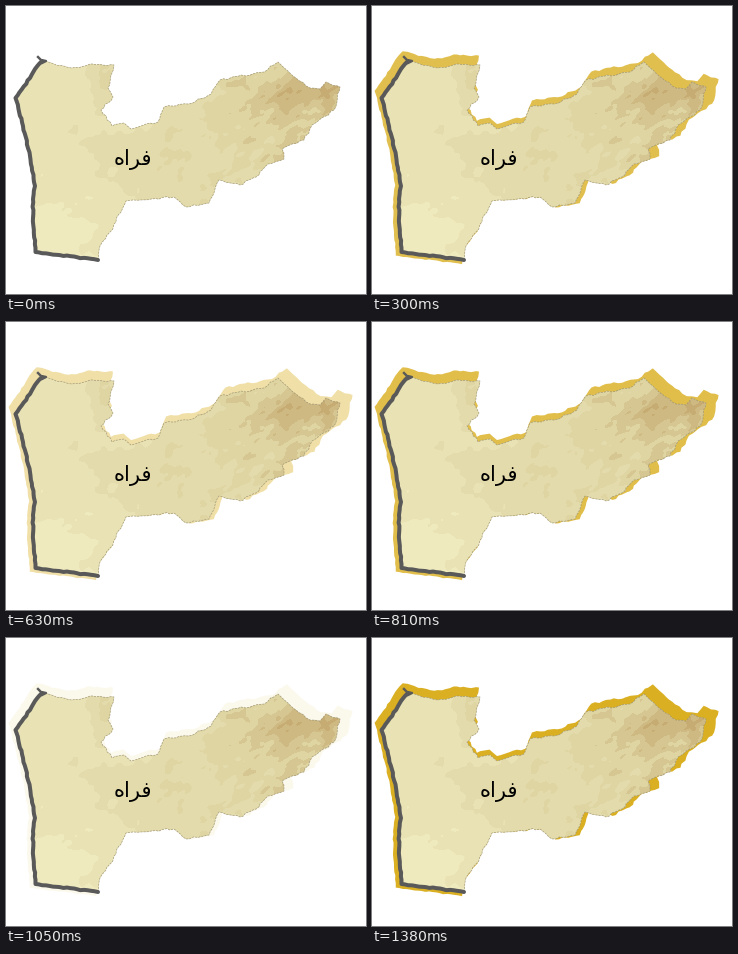
These frames come from a looping animation (360 by 288 pixels, 1580 ms). A matplotlib script:

```python
import numpy as np
import matplotlib.pyplot as plt
from matplotlib.animation import FuncAnimation
from matplotlib.patches import Polygon

W, H, DPI = 360, 288, 100
TICK = 10            # ms per drawn frame
STEP = 30            # ms per change of the glow
LOOP = 1580
GOLD = "#dab022"
GREY = "#595959"
PX = 72 / DPI

rng = np.random.default_rng(11)


def pts(text):
    return np.array([p.split(",") for p in text.split()], float)


def rough(points, amp, gap=3.5):
    """Subdivide a path and shake the new points a little."""
    out = []
    for a, b in zip(points[:-1], points[1:]):
        n = max(1, int(np.hypot(*(b - a)) / gap))
        for k in range(n):
            shake = rng.uniform(-amp, amp, 2) if k else 0
            out.append(a + (b - a) * k / n + shake)
    out.append(points[-1])
    return np.array(out)


def noise(u, v):
    """Smooth value noise in about -1..1."""
    grid = rng.uniform(-1, 1, (64, 64))
    iu, iv = np.floor(u).astype(int), np.floor(v).astype(int)
    fu, fv = u - iu, v - iv
    fu, fv = fu * fu * (3 - 2 * fu), fv * fv * (3 - 2 * fv)

    def at(a, b):
        return grid[(iv + b) % 64, (iu + a) % 64]

    top = at(0, 0) * (1 - fu) + at(1, 0) * fu
    low = at(0, 1) * (1 - fu) + at(1, 1) * fu
    return top * (1 - fv) + low * fv


def terrain():
    """Flat-shaded relief that climbs and roughens towards the east."""
    y, x = np.mgrid[0:H, 0:W] + 0.5

    def bump(cx, cy, rx, ry, h):
        return h * np.exp(-((x - cx) / rx) ** 2 - ((y - cy) / ry) ** 2)

    east = x / 330
    height = 1 + 3.6 * east ** 2
    height += bump(60, 225, 55, 45, -0.9) + bump(98, 72, 13, 26, 1.5)
    height += bump(250, 92, 42, 24, 0.8) + bump(225, 165, 40, 22, -0.6)
    height += bump(150, 150, 60, 35, 0.5)

    along, across = x * 0.83 - y * 0.55, x * 0.55 + y * 0.83
    height += 0.35 * noise(x / 21, y / 17) + 0.2 * noise(x / 7, y / 6)
    height += east ** 2 * (1.4 * noise(along / 18, across / 9)
                           + 0.9 * noise(along / 7, across / 4))
    low, mid, high = (239, 233, 190), (222, 213, 162), (198, 172, 115)
    level = np.clip(np.round(height), 0, 6)
    return np.dstack([np.interp(level, (0, 3, 6), c) / 255
                      for c in zip(low, mid, high)])


border = pts("36,55 29,63 24,72 9.5,92 17,120 24,150 29,180 27,193 27,212 "
             "29.5,246 92,254")

south = pts("92,254 94,240 104,226 120,195 168,191 180,201 203,197 213,174 "
            "234,179 250,171 262,158 278,153 276,143 298,134 306,119 328,104 "
            "334,81")

north = pts("334,81 320,76 314,83 304,82 287,70 272,56 258,66 214,74 205,88 "
            "182,98 158,101 152,116 125,123 118,117 106,120 95,104 107,91 "
            "102,82 108,59 87,58 66,62 36,55")

line = rough(border, 0.5)
rim = rough(np.vstack([south, north[1:]]), 1.0)
outline = np.vstack([line, rim])

# The glow is the same outline, slightly enlarged about a fixed point
centre, scale = np.array([125, 194]), np.array([1.06, 1.07])
halo = centre + (outline - centre) * scale

fig = plt.figure(figsize=(W / DPI, H / DPI), dpi=DPI, facecolor="white")
ax = fig.add_axes([0, 0, 1, 1])

glow = Polygon(halo, closed=True, fc=GOLD, ec="none", zorder=1)
land = Polygon(outline, closed=True, fc="#e9e0b3", ec="none", zorder=2)
ax.add_patch(glow)
ax.add_patch(land)
relief = ax.imshow(terrain(), extent=(0, W, H, 0), interpolation="nearest",
                   zorder=3)
relief.set_clip_path(land)

ax.plot(*rim.T, color="#8f8668", lw=0.7 * PX, alpha=0.75, dashes=(3, 1.5),
        zorder=4)
ax.plot(*line.T, color=GREY, lw=4 * PX, solid_joinstyle="round",
        solid_capstyle="round", zorder=5)
ax.plot([32, 35, 40, 36], [51, 54, 55, 57], color=GREY, lw=2.4 * PX, zorder=5)

# Joined Arabic letter forms in visual order, left to right
ax.text(127, 159, "\ufee9\ufe8d\ufeae\ufed3", family="DejaVu Sans",
        size=21 * PX, color="black", ha="center", va="baseline", zorder=6)

ax.set(xlim=(0, W), ylim=(H, 0), aspect="auto")
ax.axis("off")

# Steps at which the glow turns: out, full, out, full, out, full
TURNS = [0, 8, 18, 25.5, 34, 46]


def update(i):
    step = i * TICK // STEP
    glow.set_alpha(np.interp(step, TURNS, [0, 1] * 3))
    return [glow]


anim = FuncAnimation(fig, update, frames=LOOP // TICK, interval=TICK,
                     repeat=True, repeat_delay=0, blit=False)
plt.show()
```
